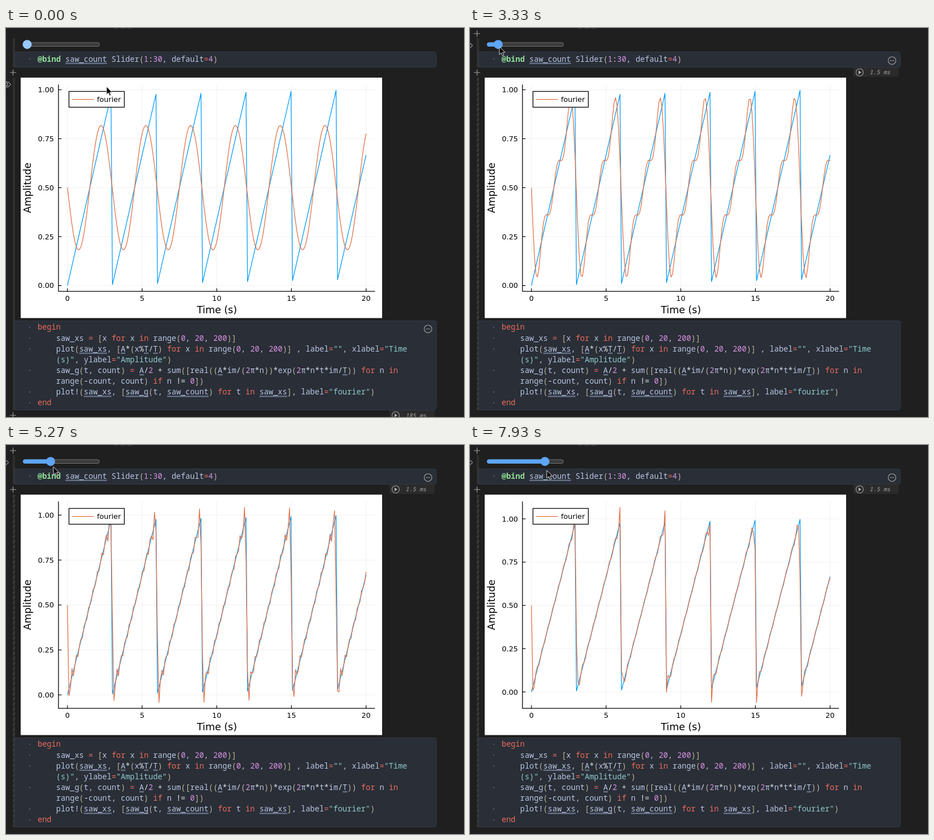
Animation, 811 px wide and 690 px high, one loop 8000 ms. Source, as an HTML page:

```html
<!DOCTYPE html>
<html lang="en">
<head>
<meta charset="utf-8">
<title>Fourier series notebook</title>
<style>
  html, body { margin: 0; width: 100%; height: 100%; overflow: hidden; background: #1f1f1f; }
  svg { display: block; width: 811px; height: 690px; }
  .code { font: 500 13.64px "Noto Sans Mono", monospace; white-space: pre; fill: #b9c5e0; }
  .kw { fill: #ec6c5c; }
  .num { fill: #d992e2; }
  .str { fill: #90cbc9; }
  .br { fill: #c0b598; }
  .op { fill: #dfe2e8; }
  .macro { fill: #90e096; font-weight: 600; }
  .plot { font: 12.8px "DejaVu Sans", sans-serif; fill: #000; }
  .title { font-size: 17.5px; text-anchor: middle; }
  .badge { font: italic 10.2px "Noto Sans Mono", monospace; fill: #b0a8a8; }
  .icon { fill: none; stroke: #a4a4a4; stroke-width: 1.1; }
  .curve { fill: none; stroke-width: 1.25; stroke-linejoin: round; }
  .cell { fill: #292e37; stroke: #343b47; }
  .bar { fill: #303030; }
</style>
</head>
<body>
<svg id="stage" viewBox="0 0 811 690">
  <defs>
    <pattern id="stripes" width="4" height="9" patternUnits="userSpaceOnUse">
      <rect width="4" height="9" fill="#3a3a3a"/>
      <path d="M0 5L4 1V5L0 9Z" fill="#282828"/>
    </pattern>
  </defs>
  <path d="M192 0h5M203 0h8M215 0h8" stroke="#555" stroke-width="1.4"/>

  <rect class="bar" x="12" y="18" width="4" height="52"/>
  <rect class="bar" id="bar" x="12" y="88" width="4" height="590"/>
  <path class="cell" d="M15.5 42.500H758a4 4 0 0 1 4 4V65.500a4 4 0 0 1-4 4H15.500Z"/>
  <path class="cell" d="M15.500 519.500H758a4 4 0 0 1 4 4V673.500a4 4 0 0 1-4 4H15.500Z"/>
  <g id="code" class="code"></g>

  <rect x="30.500" y="26" width="135" height="6.500" rx="3.250" fill="#3a3a3c" stroke="#747474"/>
  <rect id="fill" x="30" y="25.500" height="7.500" rx="3.700" fill="#5ea5f8"/>
  <circle id="thumb" cy="29.200" r="8"/>

  <g class="plot">
    <rect x="26" y="88" width="640" height="426.500" fill="#fff"/>
    <g id="xAxis"></g>
    <g id="yAxis"></g>
    <path d="M92.900 100.300V467.200H653.500" fill="none" stroke="#000" stroke-width="1.300"/>
    <polyline id="saw" class="curve" stroke="#009af9"/>
    <polyline id="fourier" class="curve" stroke="#e26f46"/>
    <rect x="111.500" y="112.500" width="98" height="28" fill="#fff" stroke="#000" stroke-width="1.300"/>
    <path d="M117 126.500H155.500" stroke="#e26f46" stroke-width="1.250"/>
    <text x="161" y="131">fourier</text>
    <text class="title" x="373.500" y="505.500">Time (s)</text>
    <text class="title" transform="translate(44 283.500) rotate(-90)">Amplitude</text>
  </g>

  <path class="icon" d="M7 79h11M12.500 73.500v11"/>
  <path class="icon" id="plus" d="M7 0h11M12.500-5.500v11"/>
  <g id="eye" class="icon">
    <path d="M-9 0Q0-10 8 0Q0 10-9 0Z"/>
    <circle r="2.600"/>
  </g>
  <g id="menu">
    <circle class="icon" r="6.800"/>
    <path d="M-3.500 0h1.400M-.7 0h1.400M2.100 0h1.400" stroke="#b0b0b0" stroke-width="1.500"/>
  </g>
  <g id="badge">
    <path d="M679-9H759V4a4 4 0 0 1-4 4H683a4 4 0 0 1-4-4Z" fill="#2b2b2b"/>
    <circle class="icon" cx="690" r="6.500"/>
    <path d="M688-3.200L693 0L688 3.200Z" fill="#b0b0b0"/>
    <text class="badge" id="runtime" x="707.500" y="3.600"></text>
  </g>
  <path id="cursor" d="M0 0V14L3.300 11L5.600 16.200L7.900 15.200L5.700 10.200H10Z" fill="#080808" stroke="#eee" stroke-width=".9"/>
</svg>

<script>
const $ = id => document.getElementById(id);
const LOOP = 8000, FPS = 15, PERIOD = 3, SAMPLES = 200;
const CHAR = 8.184, LINE = 19.14;

// ---- code cells ----
const TOKENS = [
  ["str", /^"[^"]*("|$)/],
  ["macro", /^@\w+/],
  ["kw", /^(begin|end|for|in|if)\b/],
  ["op", /^(!=|[*\/%+:-])/],
  ["kw", /^=/],
  ["num", /^\d+/],
  ["br", /^[()[\]]/],
  ["id", /^[a-zA-Z_]\w*!?/],
  ["txt", /^./]
];
const LINKED = /^(saw_\w+|A|T)$/;
const escape = s => s.replace(/&/g, "&amp;").replace(/</g, "&lt;");

function codeLine(src, indent, y, bullet, openString) {
  const x = 56 + indent * CHAR;
  let col = 0, spans = "", marks = "";
  const put = (cls, s) => {
    spans += `<tspan class="${cls}">${escape(s)}</tspan>`;
    if (cls === "id" && LINKED.test(s) && col)
      marks += `<rect x="${x + col * CHAR}" y="${y + 2}" width="${s.length * CHAR}" height="2.4" fill="#667289"/>`;
    col += s.length;
  };
  if (openString) put("str", src.slice(0, src.indexOf('"') + 1));
  while (col < src.length) {
    const rest = src.slice(col);
    const [cls, re] = TOKENS.find(([, r]) => r.test(rest));
    put(cls, rest.match(re)[0]);
  }
  const dot = bullet ? `<circle cx="42" cy="${y - 4.5}" r="1.4" fill="#4c566b"/>` : "";
  return `${dot}${marks}<text x="${x}" y="${y}">${spans}</text>`;
}

const body = [
  ["begin", 0, true],
  ["saw_xs = [x for x in range(0, 20, 200)]", 4, true],
  ['plot(saw_xs, [A*(x%T/T) for x in range(0, 20, 200)] , label="", xlabel="Time', 4, true],
  ['(s)", ylabel="Amplitude")', 4, false, true],
  ["saw_g(t, count) = A/2 + sum([real((A*im/(2π*n))*exp(2π*n*t*im/T)) for n in", 4, true],
  ["range(-count, count) if n != 0])", 4, false],
  ['plot!(saw_xs, [saw_g(t, saw_count) for t in saw_xs], label="fourier")', 4, true],
  ["end", 0, true]
];
$("code").innerHTML =
  codeLine("@bind saw_count Slider(1:30, default=4)", 0, 59.5, true) +
  body.map(([s, indent, dot, open], i) => codeLine(s, indent, 535.4 + i * LINE, dot, open)).join("");

// ---- plot ----
const TOP = 100.3, BOTTOM = 467.2;
const px = x => 108.8 + x * 26.44;
const xs = Array.from({ length: SAMPLES }, (_, i) => 20 * i / (SAMPLES - 1));
const saw = xs.map(x => x % PERIOD / PERIOD);
const series = (x, count) => {
  let y = 0.5;
  for (let n = 1; n <= count; n++) y -= Math.sin(2 * Math.PI * n * x / PERIOD) / (Math.PI * n);
  return y;
};

$("xAxis").innerHTML = [0, 5, 10, 15, 20].map(v => `
  <path d="M${px(v)} ${TOP}V${BOTTOM}" stroke="#f0f0f0"/>
  <path d="M${px(v)} ${BOTTOM}v-5.500" stroke="#000" stroke-width="1.200"/>
  <text x="${px(v)}" y="484.400" text-anchor="middle">${v}</text>`).join("");

let shown = 0;
function drawPlot(count) {
  if (count === shown) return;
  shown = count;
  const sum = xs.map(x => series(x, count));
  const lo = Math.min(...saw, ...sum), range = Math.max(...saw, ...sum) - lo;
  const py = v => BOTTOM - ((v - lo) / range + 0.03) / 1.06 * (BOTTOM - TOP);
  const points = ys => ys.map((y, i) => px(xs[i]).toFixed(2) + "," + py(y).toFixed(2)).join(" ");
  $("saw").setAttribute("points", points(saw));
  $("fourier").setAttribute("points", points(sum));
  $("yAxis").innerHTML = [0, 0.25, 0.5, 0.75, 1].map(v => `
    <path d="M92.900 ${py(v)}H653.500" stroke="#f0f0f0"/>
    <path d="M92.900 ${py(v)}h5.500" stroke="#000" stroke-width="1.200"/>
    <text x="85" y="${py(v) + 4.6}" text-anchor="end">${v.toFixed(2)}</text>`).join("");
}

// ---- timeline: [ms, value, ...] ----
const pointer = [
  [0, 178, 104], [70, 150, 90], [200, 70, 50], [330, 38, 34], [400, 32, 32],
  [600, 32, 32], [730, 36, 35], [1730, 36, 35], [2070, 45, 33], [2670, 45, 33],
  [2870, 49, 33], [3070, 49, 33], [3330, 52, 33], [3670, 54, 33], [4870, 77, 36],
  [5800, 93, 42], [6800, 115, 43], [7930, 136, 45]
];
const slider = [
  [0, 1], [1790, 1], [1800, 1.5], [2730, 2.5], [3130, 3.5], [3800, 4.5],
  [4100, 5.5], [4870, 9.6], [5800, 13.8], [6800, 18.6], [7930, 24]
];
const renders = [
  [0, 1], [2270, 2], [3200, 3], [3600, 4], [3970, 5], [4400, 6], [4800, 8],
  [5230, 10], [5670, 12], [6070, 14], [6400, 15], [6800, 17], [7200, 19], [7630, 21]
];

function lerpKeys(keys, t, k = 1) {
  const i = keys.findIndex(key => key[0] > t);
  if (i < 0) return keys[keys.length - 1][k];
  const a = keys[i - 1], b = keys[i];
  return a[k] + (b[k] - a[k]) * (t - a[0]) / (b[0] - a[0]);
}
const stepKeys = (keys, t) => keys.filter(key => key[0] <= t).pop()[1];
const move = (id, x, y) => $(id).setAttribute("transform", `translate(${x} ${y})`);

function render(ms) {
  const frame = Math.floor((ms + 5) % LOOP * FPS / 1000);
  const t = Math.round(frame * 100 / FPS) * 10;

  const onSlider = t >= 200, pressed = t >= 1070;
  move("plus", 0, onSlider ? 10 : 687);
  move("eye", pressed ? -3.5 : 0.5, onSlider ? 31 : 100);
  move("menu", 747.3, onSlider ? 57.8 : 533.8);
  move("badge", 0, onSlider ? 78.8 : 687);
  $("runtime").textContent = onSlider ? "1.5 ms" : "185 ms";

  const value = Math.round(lerpKeys(slider, t));
  const x = 37.5 + (value - 1) * 120 / 29;
  $("thumb").setAttribute("cx", x);
  $("thumb").setAttribute("fill", pressed ? "#5ea5f8" : "#99c8fd");
  $("fill").setAttribute("width", pressed ? x - 30 : 0);

  const running = t >= 1800 && t < 2270 || t >= 2730;
  $("bar").style.fill = running ? "url(#stripes)" : "";
  drawPlot(stepKeys(renders, t));
  move("cursor", lerpKeys(pointer, t, 1), lerpKeys(pointer, t, 2));
}

const start = performance.now();
function tick() {
  render(performance.now() - start);
  requestAnimationFrame(tick);
}
tick();
</script>
</body>
</html>
```
